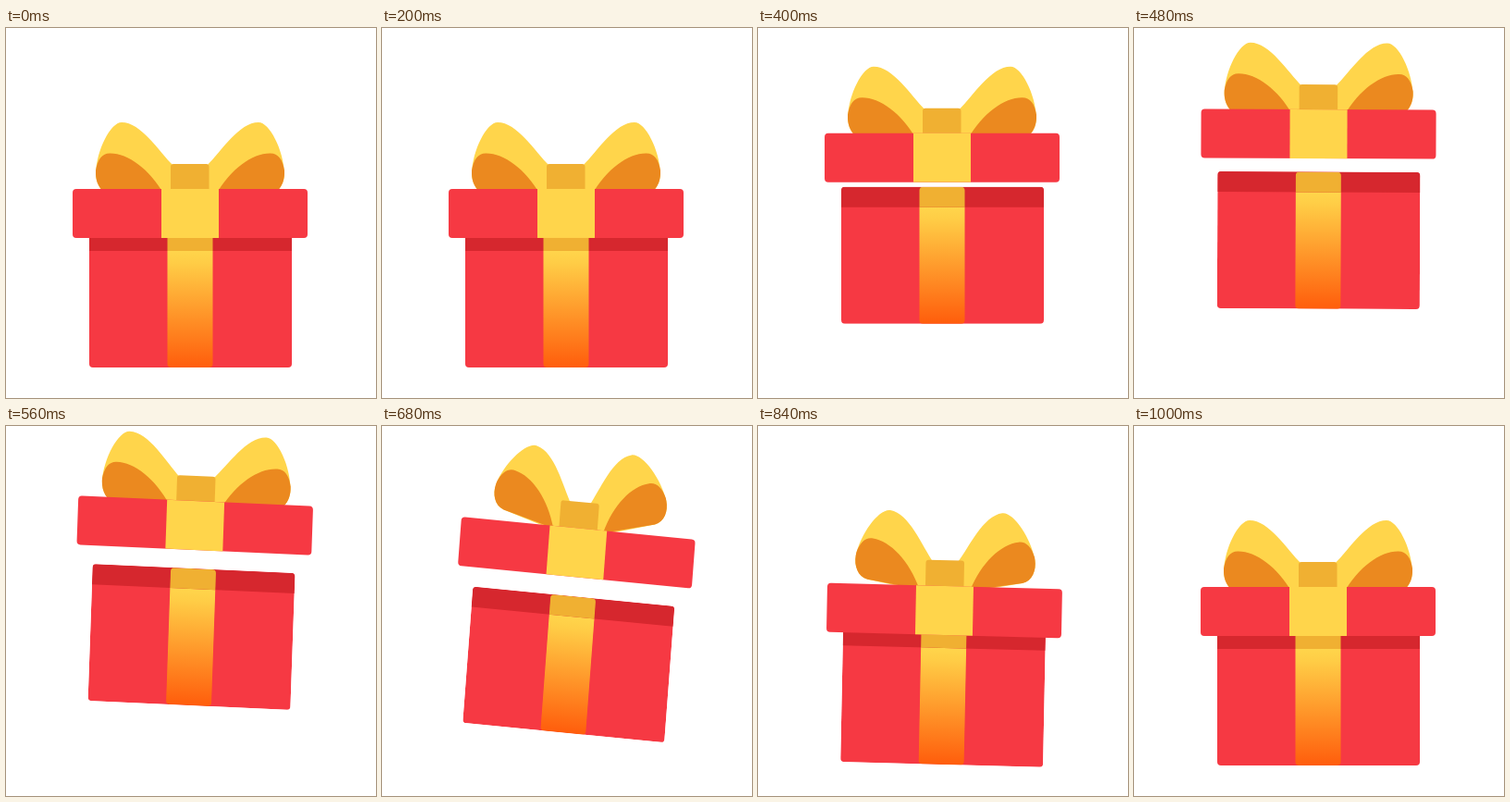
Write an HTML page that moves like this. It is 400x400 px and loops after 1040 ms.

```html
<!DOCTYPE html>
<html lang="en">
<head>
<meta charset="utf-8">
<title>Gift box</title>
<style>
  html, body { margin: 0; width: 100%; height: 100%; overflow: hidden; background: #fff; }
  svg { display: block; width: 100vw; height: 100vh; }
</style>
</head>
<body>
<svg viewBox="0 0 400 400">
  <defs>
    <linearGradient id="glow" x1="0" y1="241" x2="0" y2="367" gradientUnits="userSpaceOnUse">
      <stop offset="0" stop-color="#ffd54b"/>
      <stop offset=".1" stop-color="#ffcd46"/>
      <stop offset="1" stop-color="#ff5d0c"/>
    </linearGradient>
    <clipPath id="bodyShape"><rect x="90" y="219" width="219" height="148" rx="4"/></clipPath>
    <clipPath id="ribbonShape"><rect x="174.500" y="219" width="49" height="148" rx="4"/></clipPath>
    <g id="loop">
      <path fill="#ffd54b" d="M181 149C165 133 146 102 125 102C113 102 98 132 97 157C97 168 103 179 114 180L186 182Z"/>
      <path fill="#eb891f" d="M97 154C99 142 104 135.500 112 135.500C131 135 155 152 171 180L114 180C103 179 97 168 97 157Z"/>
    </g>
  </defs>
  <g id="gift">
    <g clip-path="url(#bodyShape)">
      <rect x="90" y="219" width="219" height="148" fill="#f63943"/>
      <rect x="90" y="219" width="219" height="22" fill="#d6272e"/>
    </g>
    <g clip-path="url(#ribbonShape)">
      <rect x="174" y="241" width="50" height="126" fill="url(#glow)"/>
      <rect x="174" y="219" width="50" height="22" fill="#f0b032"/>
    </g>
    <g id="lid">
      <use id="left" href="#loop"/>
      <g transform="matrix(-1 0 0 1 398 0)"><use id="right" href="#loop"/></g>
      <rect id="knot" x="178" y="147" width="41.500" height="36" rx="3" fill="#f0b032"/>
      <rect x="72" y="174" width="254" height="53" rx="4" fill="#f63943"/>
      <rect x="168" y="174" width="62" height="53" fill="#ffd54b"/>
    </g>
  </g>
</svg>
<script>
const LOOP = 1040, STEP = 40;
const PIVOT = { x: 199, y: 323 };

// Share of the span from start to end that has passed, 0 to 1.
const part = (t, start, end) => Math.min(1, Math.max(0, (t - start) / (end - start)));

const inOut = power => p => p < 0.5 ? (2 * p) ** power / 2 : 1 - (2 - 2 * p) ** power / 2;
const cubic = inOut(3), quart = inOut(4);
const sine = p => (1 - Math.cos(Math.PI * p)) / 2;
const quadOut = p => 1 - (1 - p) ** 2;
const drop = p => 1 - (1 - p ** 1.8) ** 4.1;   // gentle start, long soft landing

const jump = t => -65 * (quart(part(t, 168, 575)) - drop(part(t, 560, 920)));
const tilt = t => 5.6 * Math.sin(Math.PI * part(t, 447, 922)) ** 2;
const open = t => 30 * (quadOut(part(t, 320, 640)) - cubic(part(t, 640, 840)));
const flap = t => sine(part(t, 560, 680)) - sine(part(t, 720, 1000));

const $ = id => document.getElementById(id);
const [gift, lid, left, right, knot] = ["gift", "lid", "left", "right", "knot"].map($);
const setTransform = (el, value) => el.setAttribute("transform", value);

function draw(t) {
  const angle = tilt(t) * Math.PI / 180, sin = Math.sin(angle), cos = Math.cos(angle);
  const { x, y } = PIVOT;
  // Upright edges lean a little less than the level ones.
  setTransform(gift, `translate(${x} ${y + jump(t)}) matrix(${cos} ${sin} ${-0.77 * sin} ${cos} 0 0) translate(${-x} ${-y})`);
  setTransform(lid, `translate(0 ${-open(t)})`);
  const swing = flap(t);
  for (const side of [left, right]) setTransform(side, `rotate(${15 * swing} 184 182)`);
  setTransform(knot, `translate(0 ${-1.5 * swing})`);
}

function tick() {
  draw(Math.floor(performance.now() % LOOP / STEP) * STEP);
  requestAnimationFrame(tick);
}
tick();
</script>
</body>
</html>
```
